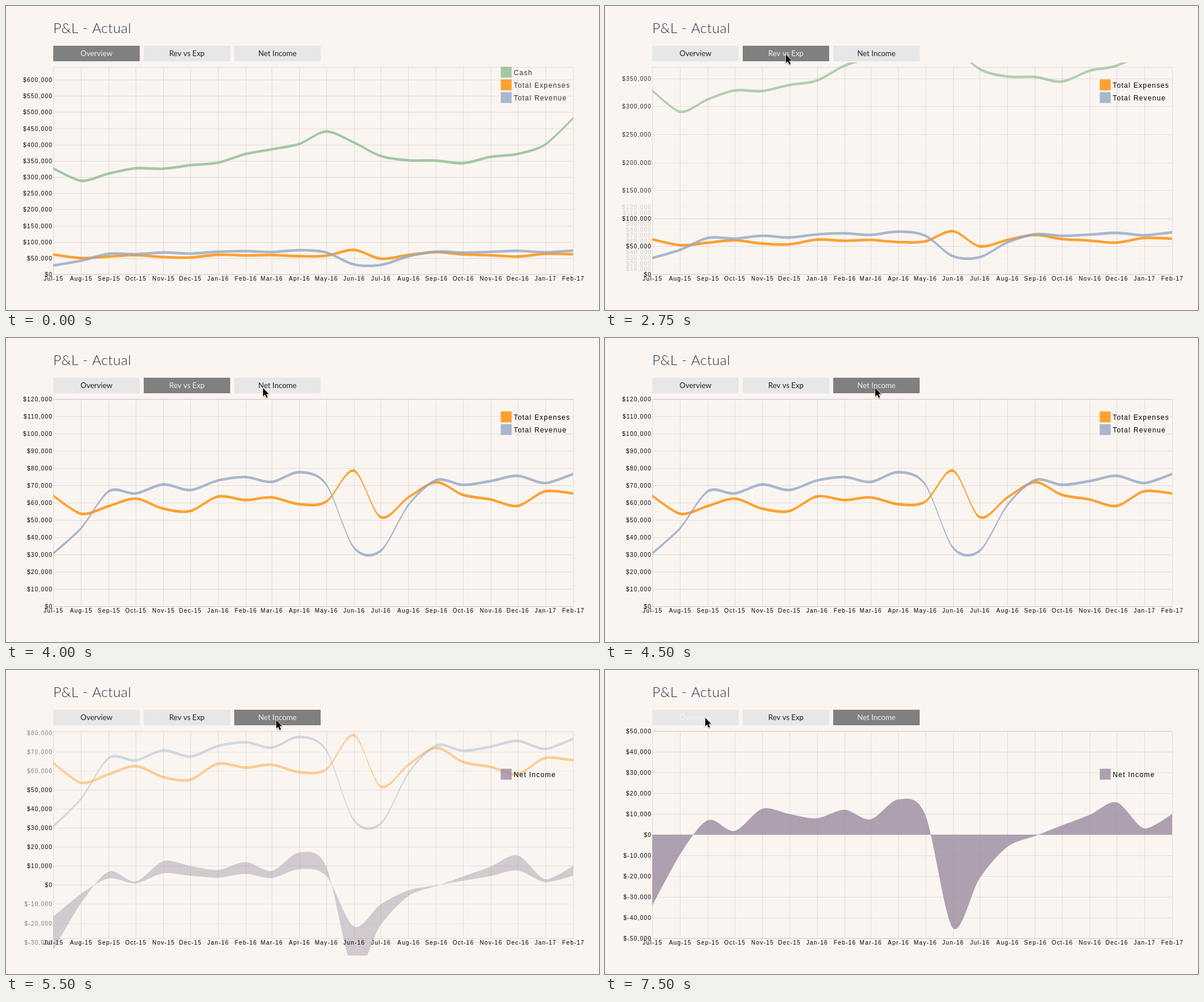
Write an HTML page with a canvas that moves like this. It is 1029x528 px and loops after 8000 ms.

```html
<!DOCTYPE html>
<html lang="en">
<head>
<meta charset="utf-8">
<title>P&amp;L - Actual</title>
<style>
  html, body { margin: 0; width: 100%; height: 100%; overflow: hidden; background: #faf5f1; }
  canvas { display: block; }
</style>
</head>
<body>
<canvas id="stage" width="1029" height="528"></canvas>
<script>
const ctx = document.getElementById('stage').getContext('2d');
const LOOP = 8000, STEP = 250;
const LEFT = 82, RIGHT = 984, TOP = 106, BOTTOM = 466;
const RIBBON = 4.6, GRID = 'rgba(0,0,0,.1)';

// Values in thousands of dollars
const series = [
  { name: 'Cash', color: '143,188,143', views: [0], data: [330.7, 292.6, 314.8, 330.7, 329.8, 340.5, 348.5, 375.1, 389.3, 406.2, 444.3, 410.6, 368.9, 355.6, 354.7, 346.7, 366.2, 375.1, 404.4, 485.2] },
  { name: 'Total Expenses', color: '255,140,0', views: [0, 1], data: [64.8, 54.3, 58.8, 63.1, 57.3, 55.9, 64.3, 62.3, 63.8, 59.9, 61.3, 79.3, 52.4, 63.8, 72.6, 65.3, 62.6, 58.9, 67.4, 66.1] },
  { name: 'Total Revenue', color: '148,168,196', views: [0, 1], data: [31.4, 45.9, 67.3, 66.1, 71.3, 68.1, 73.6, 75.6, 72.8, 78.4, 71.4, 34.8, 32.9, 59.4, 73.8, 71.1, 73.3, 76.3, 72.1, 77.4] },
  { name: 'Net Income', color: '155,139,161', views: [2], area: true, data: [-34.2, -9.6, 7, 1.8, 12.5, 10, 7.9, 12, 7.4, 17, 9.8, -45, -21, -5.8, -0.6, 4.5, 9.6, 15.6, 3, 10] }
];
const views = [
  { label: 'Overview', zero: 466, scale: 0.5633, min: 0, max: 600, step: 50 },
  { label: 'Rev vs Exp', zero: 466, scale: 3, min: 0, max: 120, step: 10 },
  { label: 'Net Income', zero: 286, scale: 3.6, min: -50, max: 50, step: 10 }
];
const changes = [{ at: 2055, from: 0, to: 1 }, { at: 4490, from: 1, to: 2 }];
const hovers = [[2000, 1], [4250, 2], [7500, 0]];
const moves = [
  [250, 1250, 813, 22, 313.5, 83.5],
  [3500, 4250, 313.5, 83.5, 468.5, 86],
  [6750, 7500, 468.5, 86, 173.5, 82]
];

const DAY = 864e5, start = Date.UTC(2015, 6, 1), end = Date.UTC(2017, 1, 1);
const months = Array.from({ length: 20 }, (_, i) => {
  const d = new Date(Date.UTC(2015, 6 + i, 1));
  const name = d.toLocaleString('en-US', { month: 'short', timeZone: 'UTC' });
  return {
    x: LEFT + (RIGHT - LEFT) * (d - start) / (end - start),
    label: name + '-' + String(d.getUTCFullYear()).slice(2)
  };
});

const clamp = t => Math.max(0, Math.min(1, t));
const mix = (a, b, p) => a + (b - a) * p;
const cubic = t => t < 0.5 ? 4 * t ** 3 : 1 - 4 * (1 - t) ** 3;

function text(str, x, y, font, color, align = 'left', spacing = 0) {
  ctx.font = font;
  ctx.fillStyle = color;
  ctx.textAlign = align;
  ctx.letterSpacing = spacing + 'px';
  ctx.fillText(str, x, y);
}

function line(x1, y1, x2, y2) {
  ctx.beginPath();
  ctx.moveTo(x1, y1);
  ctx.lineTo(x2, y2);
  ctx.stroke();
}

// Cardinal spline with quadratic end pieces
function spline(pts) {
  const n = pts.length;
  const tan = i => [0, 1].map(k => 0.15 * (pts[i + 1][k] - pts[i - 1][k]));
  const off = (i, f) => { const t = tan(i); return [pts[i][0] + t[0] * f, pts[i][1] + t[1] * f]; };
  ctx.lineTo(...pts[0]);
  ctx.quadraticCurveTo(...off(1, -2 / 3), ...pts[1]);
  for (let i = 1; i < n - 2; i++) ctx.bezierCurveTo(...off(i, 1), ...off(i + 1, -1), ...pts[i + 1]);
  ctx.quadraticCurveTo(...off(n - 2, 2 / 3), ...pts[n - 1]);
}

function state(t) {
  let s = { from: 0, to: 0, p: 0 };
  for (const c of changes) {
    if (t > c.at) s = { from: c.from, to: c.to, p: cubic(clamp((t - c.at) / 2000)) };
  }
  return s;
}

function drawChart({ from, to, p }) {
  const a = views[from], b = views[to];
  const zero = mix(a.zero, b.zero, p), scale = mix(a.scale, b.scale, p);
  const y = v => zero - scale * v;
  const fade = (inA, inB) => (inA ? 1 - p : 0) + (inB ? p : 0);
  const axisFont = '10px "Liberation Sans", Arial, sans-serif';

  ctx.save();
  ctx.beginPath();
  ctx.rect(0, 98, 1029, 398);
  ctx.clip();

  ctx.strokeStyle = GRID;
  ctx.lineWidth = 1;
  ctx.strokeRect(LEFT + 0.5, TOP + 0.5, RIGHT - LEFT, BOTTOM - TOP);
  for (const m of months.slice(1, -1)) {
    const x = Math.round(m.x) + 0.5;
    line(x, TOP, x, BOTTOM);
  }
  const has = (view, v) => v >= view.min && v <= view.max && v % view.step === 0;
  const ticks = [];
  for (let v = -50; v <= 600; v += 10) {
    const alpha = fade(has(a, v), has(b, v));
    if (alpha > 0) ticks.push({ v, alpha, y: Math.round(y(v)) + 0.5 });
  }
  for (const k of ticks) {
    ctx.globalAlpha = k.alpha;
    line(LEFT, k.y, RIGHT, k.y);
  }

  for (const s of series) {
    ctx.globalAlpha = 0.8 * fade(s.views.includes(from), s.views.includes(to));
    if (!ctx.globalAlpha) continue;
    const base = v => s.area ? y(v * (1 - p)) : y(v) + RIBBON;
    ctx.fillStyle = `rgb(${s.color})`;
    ctx.beginPath();
    spline(s.data.map((v, i) => [months[i].x, y(v)]));
    spline(s.data.map((v, i) => [months[i].x, base(v)]).reverse());
    ctx.fill();
  }

  for (const k of ticks) {
    ctx.globalAlpha = k.alpha;
    text('$' + (k.v * 1000).toLocaleString('en-US'), 81, k.y + 3, axisFont, '#000', 'right', 1.2);
  }
  ctx.globalAlpha = 1;
  for (const m of months) text(m.label, m.x + 0.5, 476.5, axisFont, '#000', 'center', 1.2);

  const shown = p > 0.001 ? to : from;
  series.forEach((s, i) => {
    if (!s.views.includes(shown)) return;
    ctx.fillStyle = `rgba(${s.color},.8)`;
    ctx.fillRect(858.5, 105.5 + 22 * i, 19, 19);
    text(s.name, 881, 120 + 22 * i, '12px "Liberation Sans", Arial, sans-serif', shown ? '#000' : '#333', 'left', 1.2);
  });
  ctx.restore();
}

function drawButtons(active, hover) {
  views.forEach((v, i) => {
    const x = LEFT + 157 * i;
    ctx.fillStyle = i === active ? '#808080' : '#e7e7e7';
    ctx.fillRect(x, 69, 150, 27);
    const color = i === active ? '#eeeeee' : i === hover ? '#f7f5f3' : '#222';
    text(v.label, x + 75, 86.5, '13px Lato, sans-serif', color, 'center');
  });
}

function drawCursor(t) {
  const move = moves.filter(m => t >= m[0]).pop();
  if (!move) return;
  const [t0, t1, x0, y0, x1, y1] = move;
  const p = cubic(clamp((t - t0) / (t1 - t0)));
  ctx.save();
  ctx.translate(mix(x0, x1, p), mix(y0, y1, p));
  const arrow = new Path2D('M.5 1V15.5L3.8 12.4L6.2 18L8.6 17L6.2 11.5H10.6Z');
  ctx.strokeStyle = '#fff';
  ctx.lineWidth = 1.6;
  ctx.lineJoin = 'round';
  ctx.shadowColor = 'rgba(0,0,0,.35)';
  ctx.shadowBlur = 2;
  ctx.shadowOffsetY = 1;
  ctx.stroke(arrow);
  ctx.shadowColor = 'transparent';
  ctx.fillStyle = '#000';
  ctx.fill(arrow);
  ctx.restore();
}

function draw(t) {
  const s = state(t);
  const hover = hovers.filter(h => t >= h[0]).pop();
  ctx.fillStyle = '#faf5f1';
  ctx.fillRect(0, 0, 1029, 528);
  text('P&L - Actual', LEFT, 47, '300 24px Lato, sans-serif', '#2b3044', 'left', 0.5);
  drawButtons(s.p > 0 ? s.to : s.from, hover ? hover[1] : -1);
  drawChart(s);
  drawCursor(t);
}

const begin = performance.now();
function tick() {
  const t = (performance.now() - begin) % LOOP;
  draw(Math.floor(t / STEP) * STEP);
  requestAnimationFrame(tick);
}
tick();
</script>
</body>
</html>
```
